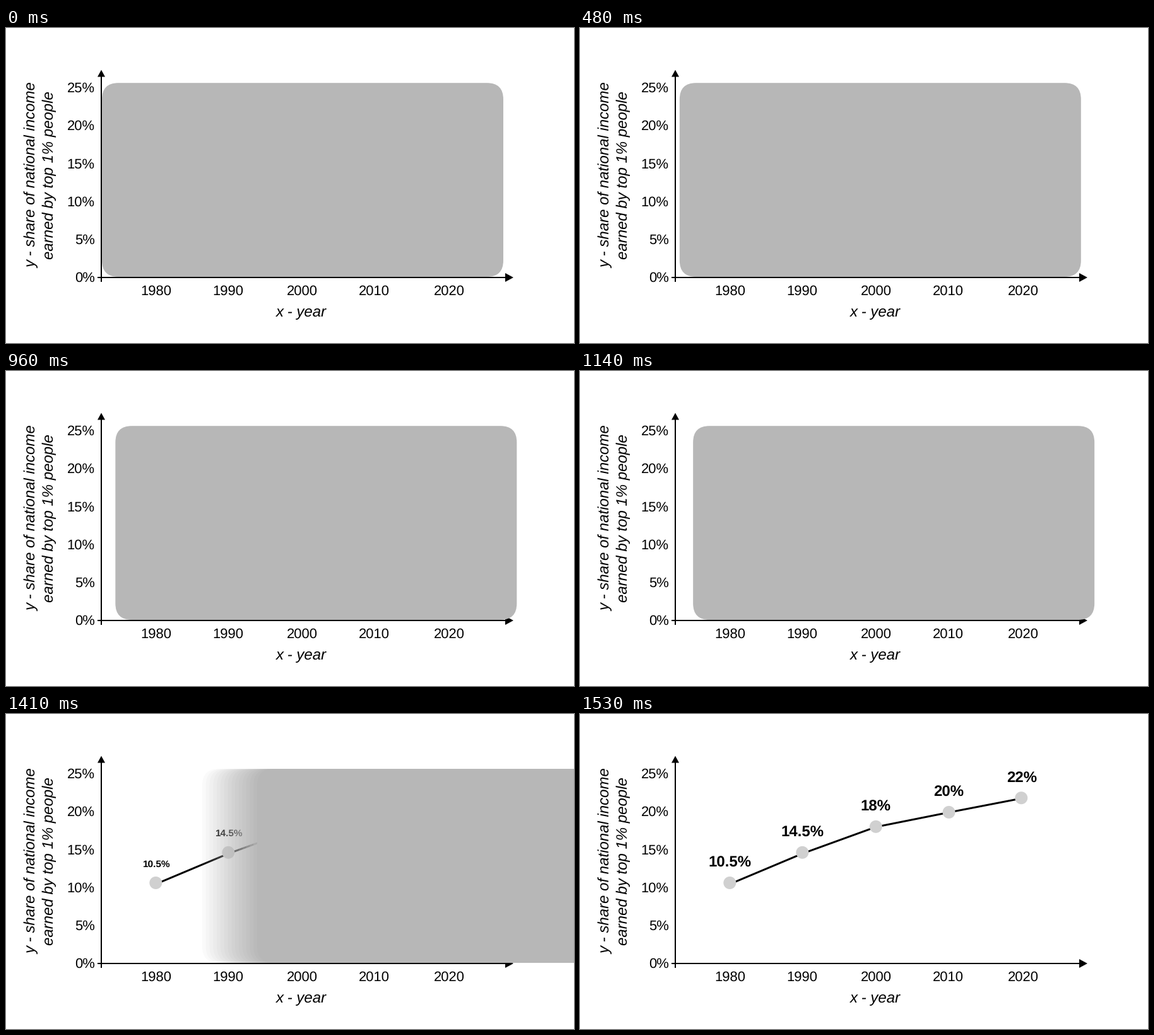
A matplotlib script that plays this animation: 900 px wide and 500 px high, repeating every 5.4 s.

```python
import matplotlib.pyplot as plt
from matplotlib.animation import FuncAnimation
from matplotlib.patches import Circle, FancyBboxPatch, Polygon

W, H, DPI = 900, 500, 100
STEP_MS, FRAMES = 30, 180
PT = 72 / DPI  # points per pixel

CREEP_START, SWEEP_START = 10, 46
CREEP_SPEED, SWEEP_SPEED = 0.97, 167.5
BLUR_WIDTH, BLUR_LAYERS = 87, 16
COVER_LEFT, COVER_TOP, COVER_W, COVER_H = 152, 87.2, 636, 307.8
POP_SCALES = [0.64, 1.02, 1.2, 1.1]  # label pop with overshoot, then 1

YEARS = [(1980, 237.5), (1990, 352), (2000, 469), (2010, 583.5), (2020, 702)]
DOTS = [(237.3, 268), (352.3, 219.8), (468.8, 178.8), (584.5, 155.9), (699.2, 133.2)]
LINE = [(237.3, 270), (352.3, 221.6), (468.8, 179.3), (584.5, 156.2), (699.2, 134)]
LABELS = [("10.5%", 238, 242.5), ("14.5%", 353, 193.5), ("18%", 468.7, 153.5),
          ("20%", 584, 131), ("22%", 700, 108)]

plt.rcParams["font.family"] = "Liberation Sans"
plt.rcParams["text.hinting"] = "none"

fig = plt.figure(figsize=(W / DPI, H / DPI), dpi=DPI, facecolor="white")
ax = fig.add_axes([0, 0, 1, 1])
ax.set_xlim(0, W)
ax.set_ylim(H, 0)
ax.axis("off")


def write(x, y, text, px, ha="center", **style):
    return ax.text(x, y, text, fontsize=px * PT, ha=ha, va="baseline",
                   color="black", **style)


def stroke(xs, ys, px, z):
    ax.plot(xs, ys, color="black", lw=px * PT, solid_capstyle="butt", zorder=z)


def arrow_head(*corners):
    ax.add_patch(Polygon(corners, color="black", lw=0, zorder=2))


# Axes
stroke([151, 151], [74, 403], 2, 2)
stroke([145, 794], [396, 396], 2, 2)
arrow_head((151, 66.5), (145, 77.5), (157, 77.5))
arrow_head((804, 396), (791, 389), (791, 403))

for i in range(6):
    write(140.5, 403 - 60.2 * i, f"{5 * i}%", 22, ha="right")
for year, x in YEARS:
    write(x, 424, str(year), 22)
write(468, 458.5, "x - year", 24, style="italic")
for x, text in [(47.5, "y - share of national income"),
                (75.5, "earned by top 1% people")]:
    write(x, 233.5, text, 24, style="italic", rotation=90, rotation_mode="anchor")

# Data
stroke(*zip(*LINE), 3, 3)
for center in DOTS:
    ax.add_patch(Circle(center, 10, color="#d0d0d0", lw=0, zorder=4))
labels = [write(x, y, text, 24, weight="bold", zorder=5) for text, x, y in LABELS]

# Each layer's alpha makes k stacked layers cover k / BLUR_LAYERS of what is below.
cover = []
for k in range(BLUR_LAYERS):
    layer = FancyBboxPatch((COVER_LEFT, COVER_TOP), COVER_W, COVER_H,
                           boxstyle="round,pad=0,rounding_size=26",
                           facecolor="#b7b7b7", lw=0,
                           alpha=1 / (BLUR_LAYERS - k), zorder=6)
    cover.append(ax.add_patch(layer))


def update(i):
    creep = CREEP_SPEED * min(max(i - CREEP_START, 0), SWEEP_START - CREEP_START)
    sweep = max(i - SWEEP_START, 0)
    left = COVER_LEFT + creep + SWEEP_SPEED * sweep
    for k, layer in enumerate(cover):
        offset = BLUR_WIDTH * (k / (BLUR_LAYERS - 1) - 0.5) if sweep else 0
        layer.set_x(left + offset)
        layer.set_visible(left + offset < W and (sweep > 0 or k == BLUR_LAYERS - 1))

    scale = POP_SCALES[sweep - 1] if sweep <= len(POP_SCALES) else 1
    for label in labels:
        label.set_visible(sweep > 0)
        label.set_fontsize(24 * PT * scale)
    return cover + labels


anim = FuncAnimation(fig, update, frames=FRAMES, interval=STEP_MS,
                     repeat=True, repeat_delay=0, blit=False)
plt.show()
```
